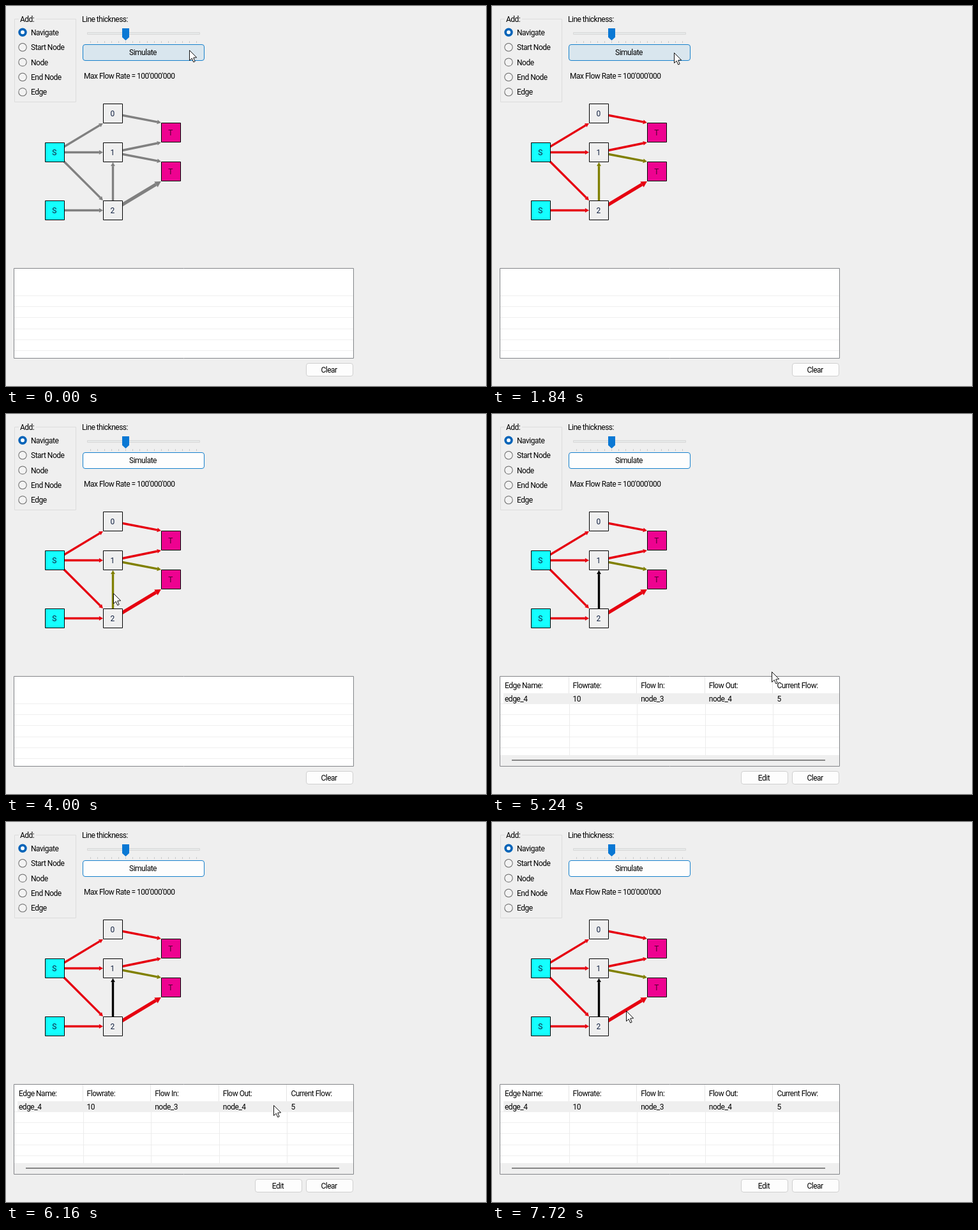
These frames come from a looping animation (752x596 px, 8000 ms). An HTML page with a canvas:

```html
<!DOCTYPE html>
<html lang="en">
<head>
<meta charset="utf-8">
<title>Flow network simulator</title>
<style>
html, body { margin: 0; width: 100%; height: 100%; overflow: hidden; background: #efefef; }
canvas { display: block; width: 752px; height: 596px; }
</style>
</head>
<body>
<canvas id="stage" width="752" height="596"></canvas>
<script>
const ctx = document.getElementById('stage').getContext('2d');
const LOOP = 8000, STEP = 40;
const PRESS = 1280, COLORED = 1400, LEAVE = 2960, SELECT = 4240;
const BG = '#efefef', FACE = '#fdfdfd';
const CELL = 30.4, SIZE = 31;

// Grid column, grid row, label
const nodes = {
  A: [2, 7, 'S'], B: [2, 10, 'S'],
  C: [5, 5, '0'], D: [5, 7, '1'], E: [5, 10, '2'],
  F: [8, 6, 'T'], G: [8, 8, 'T']
};
const edges = ['AC', 'AD', 'AE', 'BE', 'CF', 'DF', 'DG', 'EG', 'ED'];
const partial = ['DG', 'ED'], wide = 'EG', picked = 'ED';
const fills = { S: '#14ffff', T: '#ee0290' };

const columns = [
  ['Edge Name:', 'edge_4'], ['Flowrate:', '10'], ['Flow In:', 'node_3'],
  ['Flow Out:', 'node_4'], ['Current Flow:', '5']
];

// Pointer moves: start time, end time, x, y
const home = [287, 69];
const moves = [
  [40, 280, 285, 73], [2120, 2920, 232, 82], [2920, 3000, 185, 93.5],
  [3000, 3760, 168, 285], [3800, 4000, 168, 281], [4520, 5320, 446, 408],
  [5360, 6160, 418.5, 443.5], [6240, 7040, 446, 442], [7080, 7720, 209.5, 296]
];

const clamp = (v, lo, hi) => Math.min(hi, Math.max(lo, v));
const ease = u => u * u * (3 - 2 * u);

function text(s, x, y, align = 'left', color = '#000') {
  ctx.fillStyle = color;
  ctx.textAlign = align;
  ctx.fillText(s, x, y + 4);
}

function rect(x, y, w, h, fill) {
  ctx.fillStyle = fill;
  ctx.fillRect(x, y, w, h);
}

function outline(color, width = 1) {
  ctx.strokeStyle = color;
  ctx.lineWidth = width;
  ctx.stroke();
}

function box(x, y, w, h, color, fill, radius = 0) {
  ctx.beginPath();
  ctx.roundRect(x + 0.5, y + 0.5, w - 1, h - 1, radius);
  ctx.fillStyle = fill;
  ctx.fill();
  outline(color);
}

function poly(points, fill) {
  ctx.beginPath();
  points.forEach(([x, y]) => ctx.lineTo(x, y));
  ctx.closePath();
  ctx.fillStyle = fill;
  ctx.fill();
}

function button(x, y, w, h, label, color = '#d0d0d0', fill = FACE) {
  box(x, y, w, h, color, fill, 3.5);
  text(label, x + w / 2 - 1, y + h / 2, 'center');
}

function disc(x, y, r, fill) {
  ctx.beginPath();
  ctx.arc(x, y, r, 0, 2 * Math.PI);
  ctx.fillStyle = fill;
  ctx.fill();
}

function drawModes() {
  box(13, 20, 97, 131, '#dcdcdc', BG);
  rect(20, 16, 27, 8, BG);
  text('Add:', 22, 20.5);
  ['Navigate', 'Start Node', 'Node', 'End Node', 'Edge'].forEach((label, i) => {
    const y = 41.3 + i * 23.4;
    disc(26, y, 6.7, i ? '#666' : '#0063b8');
    disc(26, y, i ? 5.7 : 3, i ? '#f3f3f3' : '#fff');
    text(label, 39, y + 0.5);
  });
}

function drawSlider() {
  text('Line thickness:', 119, 20.5);
  box(127, 41, 177, 4, '#d8d8d8', '#e7eaea');
  for (let i = 0; i < 16; i++) rect(Math.round(132 + i * 11.07), 55, 1, 3, '#cacaca');
  poly([[182, 35], [193, 35], [193, 49], [187.5, 54], [182, 49]], '#0a78d4');
}

function place(id) {
  const [col, row] = nodes[id];
  const x = Math.round(col * CELL), y = Math.round(row * CELL + 1);
  return { x, y, cx: x + SIZE / 2, cy: y + SIZE / 2 };
}

// Runs from the centre of one node to the nearest point of the other
function drawEdge(edge, color) {
  const a = place(edge[0]), b = place(edge[1]);
  const width = edge === wide ? 5.2 : 3.4;
  const x = clamp(a.cx, b.x, b.x + SIZE), y = clamp(a.cy, b.y, b.y + SIZE);
  const len = Math.hypot(x - a.cx, y - a.cy);
  const ux = (x - a.cx) / len * width, uy = (y - a.cy) / len * width;
  const bx = x - ux * 1.8, by = y - uy * 1.8;
  ctx.beginPath();
  ctx.moveTo(a.cx, a.cy);
  ctx.lineTo(bx, by);
  outline(color, width);
  poly([[x, y], [bx - uy, by + ux], [bx + uy, by - ux]], color);
}

function edgeColor(edge, t) {
  if (t < COLORED) return '#808080';
  if (t >= SELECT && edge === picked) return '#000';
  return partial.includes(edge) ? '#808000' : '#e60010';
}

function drawGraph(t) {
  for (const edge of edges) drawEdge(edge, edgeColor(edge, t));
  for (const id in nodes) {
    const { x, y, cx, cy } = place(id), label = nodes[id][2];
    box(x, y, SIZE, SIZE, '#000', fills[label] || BG);
    text(label, cx - 1, cy, 'center', label === 'T' ? '#500030' : '#102040');
  }
}

function drawTable(filled) {
  box(12, 411, 533, 142, '#828488', '#fff');
  for (let i = 0; i < 6; i++) rect(13, Math.round(454 + i * 17.2), 531, 1, BG);
  if (!filled) return;
  rect(18, 438, 526, 17, BG);
  columns.forEach(([head, value], i) => {
    const x = 20 + i * 106.6;
    if (i) {
      rect(Math.round(x - 7), 412, 1, 26, '#e5e5e5');
      rect(Math.round(x - 6), 455, 1, 80, '#ececec');
    }
    text(head, x, 425.5);
    text(value, x, 447);
  });
  rect(13, 535, 531, 17, BG);
  rect(31, 542, 491, 2, '#868686');
  button(390, 560, 74, 21, 'Edit');
}

function pointer(t) {
  return moves.reduce(([x, y], [from, to, nx, ny]) => {
    const u = ease(clamp((t - from) / (to - from), 0, 1));
    return [x + (nx - x) * u, y + (ny - y) * u];
  }, home);
}

function drawPointer([x, y]) {
  ctx.save();
  ctx.translate(Math.round(x) + 0.5, Math.round(y) + 0.5);
  poly([[0, 0], [0, 16], [3.7, 12.6], [6.3, 18.5], [8.7, 17.4], [6.2, 11.6], [11.2, 11.3]], '#fff');
  outline('#111');
  ctx.restore();
}

function draw(t) {
  rect(0, 0, 752, 596, BG);
  ctx.font = '12px Roboto, "Open Sans", sans-serif';
  ctx.letterSpacing = '-0.5px';
  drawModes();
  drawSlider();
  const fill = t >= LEAVE ? FACE : t >= PRESS && t < COLORED ? '#cce0ee' : '#d9e6ee';
  button(120, 60, 191, 26, 'Simulate', '#1580cc', fill);
  text("Max Flow Rate = 100'000'000", 122, 110);
  drawGraph(t);
  drawTable(t >= SELECT);
  button(470, 560, 74, 21, 'Clear');
  drawPointer(pointer(t));
}

const start = performance.now();
function tick() {
  const t = (performance.now() - start) % LOOP;
  draw(Math.floor(t / STEP) * STEP);
  requestAnimationFrame(tick);
}
tick();
</script>
</body>
</html>
```
